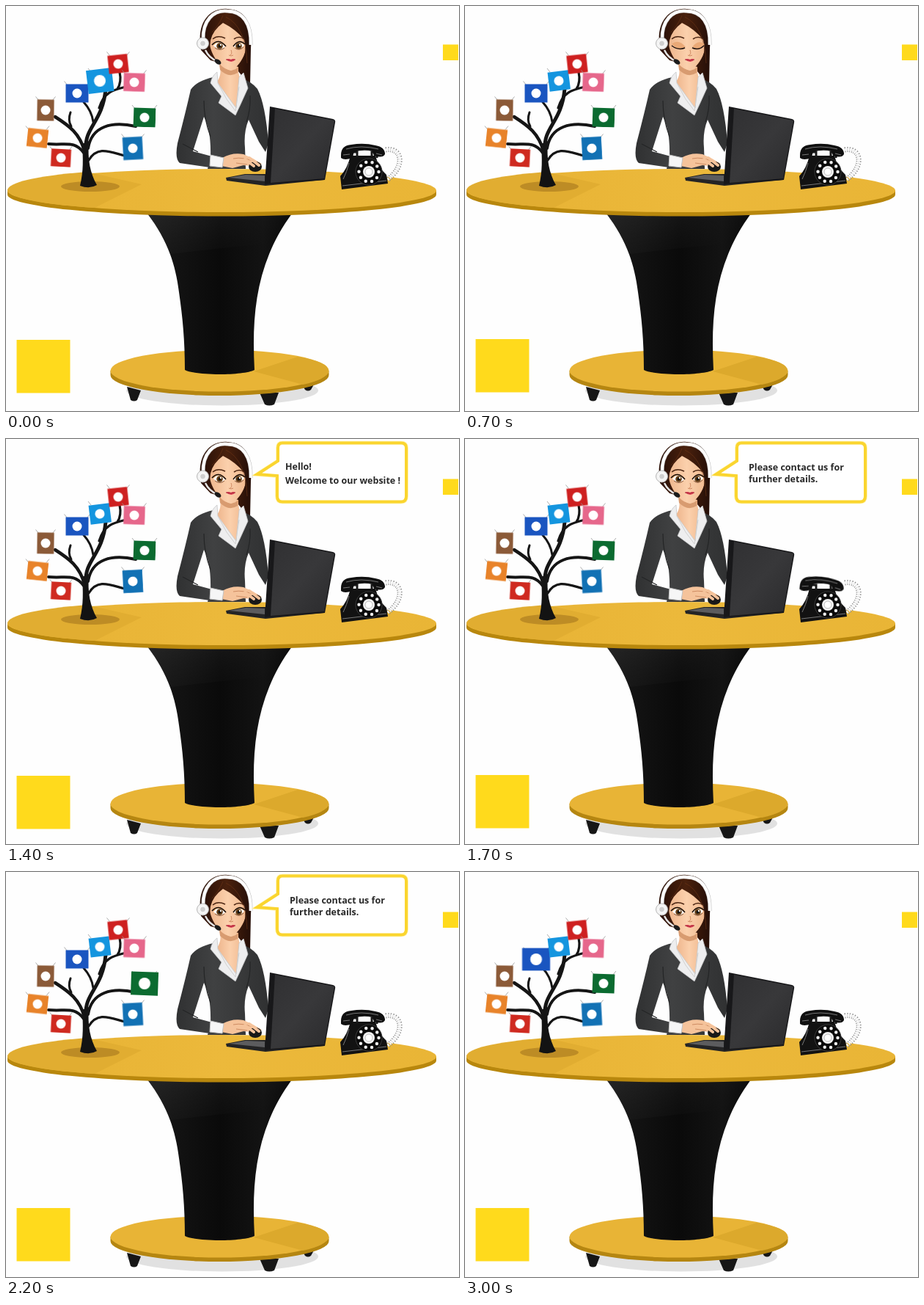
Animation, 618 px wide and 552 px high, one loop 3100 ms. Source, as an HTML page:

```html
<!DOCTYPE html>
<html lang="en">
<head>
<meta charset="utf-8">
<title>Reception desk</title>
<style>
html, body { margin: 0; width: 100%; height: 100%; overflow: hidden; background: #fefefe; }
svg { display: block; width: 618px; height: 552px; }
text { font: 700 12.5px "Open Sans", sans-serif; fill: #292929; }

.bob { animation: bob 3.1s linear infinite; }
.bob.small { animation-name: bob-small; }
.bubble, .hello, .contact, .shut, .open, .talk, .smile, .handset { animation: 3.1s step-end infinite; }
.bubble { animation-name: bubble; }
.hello { animation-name: hello; }
.contact { animation-name: contact; }
.shut { animation-name: shut; }
.open { animation-name: open; }
.talk { animation-name: talk; }
.smile { animation-name: smile; }
.handset { animation-name: ring; transform-origin: 486px 198px; }
.pulse { animation: pulse 3.1s step-end infinite; transform-box: fill-box; transform-origin: center; }

@keyframes bob {
  0%, 100% { transform: translateY(0); }
  22.6% { transform: translateY(-1px); }
  35.5% { transform: translateY(5px); }
  54.8%, 71% { transform: translateY(3px); }
  80.6% { transform: translateY(7px); }
  96.8% { transform: translateY(3px); }
}
@keyframes bob-small {
  0%, 22.6%, 100% { transform: translateY(0); }
  35.5%, 71% { transform: translateY(2px); }
  80.6% { transform: translateY(3px); }
  96.8% { transform: translateY(2px); }
}
@keyframes bubble { 0%, 77.2% { opacity: 0; } 32% { opacity: 1; } }
@keyframes hello { 0% { opacity: 1; } 48.2% { opacity: 0; } }
@keyframes contact { 0% { opacity: 0; } 48.2% { opacity: 1; } }
@keyframes shut { 0%, 25.6% { opacity: 0; } 19.2% { opacity: 1; } }
@keyframes open { 0%, 25.6% { opacity: 1; } 19.2% { opacity: 0; } }
@keyframes talk {
  0%, 38.5%, 45%, 51.4%, 64.3% { opacity: 0; }
  35.3%, 41.7%, 48.2%, 61.1% { opacity: 1; }
}
@keyframes smile {
  0%, 38.5%, 45%, 51.4%, 64.3% { opacity: 1; }
  35.3%, 41.7%, 48.2%, 61.1% { opacity: 0; }
}
@keyframes ring {
  0%, 51.4%, 58%, 64.3% { transform: none; }
  48.2%, 54.7%, 61.1% { transform: rotate(5deg); }
}
@keyframes pulse { 0% { transform: scale(1.23); } 3.2%, 100% { transform: none; } }
</style>
</head>
<body>
<svg viewBox="0 0 618 552">
  <defs>
    <linearGradient id="stem">
      <stop offset="0" stop-color="#171717"/><stop offset=".25" stop-color="#111"/>
      <stop offset=".5" stop-color="#0a0a0a"/><stop offset=".8" stop-color="#131313"/>
      <stop offset="1" stop-color="#090909"/>
    </linearGradient>
    <linearGradient id="sheen" x2="1" y2=".6">
      <stop offset="0" stop-color="#2c2c2c" stop-opacity=".7"/>
      <stop offset="1" stop-color="#181818" stop-opacity="0"/>
    </linearGradient>
    <linearGradient id="top">
      <stop offset="0" stop-color="#e6b133"/><stop offset=".5" stop-color="#ecb93b"/>
      <stop offset="1" stop-color="#e9b536"/>
    </linearGradient>
    <linearGradient id="lid" x2="1" y2="1">
      <stop offset="0" stop-color="#303032"/><stop offset=".5" stop-color="#38383a"/>
      <stop offset="1" stop-color="#2a2a2c"/>
    </linearGradient>
    <linearGradient id="suit">
      <stop offset="0" stop-color="#303132"/><stop offset=".4" stop-color="#404142"/>
      <stop offset="1" stop-color="#303132"/>
    </linearGradient>
    <linearGradient id="skin">
      <stop offset="0" stop-color="#eeb58c"/><stop offset=".5" stop-color="#fbd0ac"/>
      <stop offset="1" stop-color="#f0b98f"/>
    </linearGradient>
    <linearGradient id="hair">
      <stop offset="0" stop-color="#2b1108"/><stop offset=".5" stop-color="#4a210d"/>
      <stop offset="1" stop-color="#260f08"/>
    </linearGradient>
  </defs>

  <rect class="bob" x="14.5" y="455" width="73" height="72.5" fill="#ffda1c"/>
  <rect class="bob small" x="596" y="52.5" width="21" height="21.5" fill="#ffda1c"/>

  <!-- Stand -->
  <ellipse cx="295" cy="524" rx="131" ry="20.5" fill="#e1e1e1"/>
  <path d="M165 519L184 524 179 537Q175 540 170 537ZM346 527H372L366 543Q359 546 353 543ZM405 518L421 514 416 523Q412 526 408 523Z" fill="#161616"/>
  <path d="M142.500 497V503A149 28 0 0 0 440.500 503V497Z" fill="#b58611"/>
  <ellipse cx="291.500" cy="497" rx="149" ry="28.500" fill="#e8b436"/>
  <path d="M338 498L398 478Q440 485 440 497 438 509 405 516Z" fill="#dca92c"/>
  <path d="M193 283C219 317 231 350 236 390 241 425 244 455 244 496 258 504 324 504 339 496 335 420 341 350 390 283Z" fill="url(#stem)"/>
  <path d="M193 283H390Q375 304 365 323 292 330 224 338 214 311 193 283Z" fill="url(#sheen)"/>

  <!-- Table top -->
  <path d="M2 251V257A292.5 29.5 0 0 0 587 257V251Z" fill="#b8870d"/>
  <ellipse cx="294.5" cy="251.5" rx="292.5" ry="29.5" fill="url(#top)"/>
  <path d="M2 251C8 263 55 271 121 275L185 243 110 226Q4 235 2 251Z" fill="#e1ad31"/>

  <!-- Tree -->
  <ellipse cx="115" cy="246" rx="40" ry="7" fill="#bd8c25"/>
  <path d="M101 245C106 225 105 207 104 188L113 184C111 210 115 228 124 244Q114 250 101 245Z" fill="#131313"/>
  <g fill="none" stroke="#151515" stroke-linecap="round">
    <path d="M109 195C107 165 132 158 136 113" stroke-width="5"/>
    <path d="M107 198C101 174 86 163 67 151" stroke-width="4.5"/>
    <path d="M89 164Q84 156 88 145M119 158Q117 143 106 131" stroke-width="3"/>
    <path d="M106 200C93 183 82 190 58 188M112 194C117 163 145 157 177 164" stroke-width="4"/>
    <path d="M113 210C125 190 142 199 162 204M127 139C134 116 148 114 164 110M152 113Q158 104 155 90" stroke-width="3.2"/>
  </g>
  <g id="cards"></g>

  <!-- Receptionist -->
  <path d="M266 60C259 20 280 2 302 4 331 5 336 30 334 58L333 108Q323 97 312 83L279 74Z" fill="url(#hair)"/>
  <path d="M290 76Q296 92 288 103L313 145 324 103Q316 98 317 83Z" fill="url(#skin)"/>
  <path d="M291 79Q306 94 317 83L316 91Q304 99 292 87Z" fill="#d89b70"/>
  <path d="M277 46C278 26 291 18 305 20 322 22 329 37 328 54 327 70 314 86 307 88 295 85 279 71 277 46Z" fill="url(#skin)"/>
  <path d="M270 61Q267 17 297 10 321 8 332 42L333 105Q323 95 322 78 329 61 325 46 314 32 296 23 282 33 279 47L277 66Z" fill="url(#hair)"/>
  <path d="M281 36Q290 27 296 13M300 15Q327 28 329 78" fill="none" stroke="#733a18" opacity=".55"/>

  <path d="M282 45Q289 39 299 44M311 45Q318 40 325 45" fill="none" stroke="#4e2815" stroke-width="1.6"/>
  <g class="open">
    <path d="M282 53Q290 42 300 54ZM310 54Q318 43 326 52Z" fill="#e9a35c"/>
    <path d="M283 54Q290 45 299 55 291 63 283 54ZM311 55Q317 46 325 53 319 62 311 55Z" fill="#fff"/>
    <circle cx="291.500" cy="54.500" r="4.300" fill="#674019"/><circle cx="317.500" cy="54.500" r="4.300" fill="#674019"/>
    <circle cx="291.500" cy="54.500" r="2" fill="#111"/><circle cx="317.500" cy="54.500" r="2" fill="#111"/>
    <circle cx="293" cy="53" r="1.200" fill="#fff"/><circle cx="319" cy="53" r="1.200" fill="#fff"/>
    <path d="M281 53Q290 43 300 55M310 55Q318 44 326 52" fill="none" stroke="#19100d" stroke-width="1.6"/>
    <path d="M285 57Q292 62 298 57M312 57Q318 62 324 56" fill="none" stroke="#6b3c22" stroke-width=".8"/>
  </g>
  <g class="shut">
    <path d="M282 52Q291 44 301 56L291 59Z" fill="#eaa977"/>
    <path d="M310 56Q318 45 327 52L318 59Z" fill="#eaa977"/>
    <path d="M282 54Q291 61 300 57M310 57Q319 61 326 54" fill="none" stroke="#20120e" stroke-width="1.5"/>
  </g>
  <path d="M307 60Q309 65 306 67M304 67Q307 69 310 67" fill="none" stroke="#cf8962"/>
  <path class="smile" d="M300 73Q303 71 307 73 310 71 313 73 308 79 300 73Z" fill="#dd4257"/>
  <path class="smile" d="M300 73Q306 75 313 73" fill="none" stroke="#8f1f2c" stroke-width=".7"/>
  <g class="talk">
    <circle cx="307" cy="75" r="4.500" fill="#e2607a"/>
    <ellipse cx="307" cy="75" rx="2" ry="1.500" fill="#761b2a"/>
  </g>

  <g fill="none">
    <path d="M269 46C268 20 283 5 302 7 323 7 335 24 334 53" stroke="#bdbdbd" stroke-width="5"/>
    <path d="M269 46C268 20 283 5 302 7 323 7 335 24 334 53" stroke="#fff" stroke-width="3.8"/>
  </g>
  <circle cx="268.500" cy="51" r="8" fill="#f4f4f4" stroke="#b5b5b5"/>
  <circle cx="268.500" cy="51" r="4" fill="#cfcfcf" stroke="#fff"/>
  <path d="M272 60Q277 71 288 75" fill="none" stroke="#e4e4e4" stroke-width="2.5"/>
  <ellipse cx="289" cy="76" rx="5" ry="3" transform="rotate(35 289 76)" fill="#1b1b1b"/>

  <path d="M283 97Q260 102 252 114 245 145 234 187 230 208 237 214L278 220 281 205 255 198 270 151Q280 170 279 205L275 222H327L326 193Q324 172 331 155L345 185 354 199 358 187Q354 134 343 113 334 102 321 99L313 145Z" fill="url(#suit)"/>
  <path d="M270 129Q270 155 279 178M333 122Q334 141 328 158M241 188L262 199" fill="none" stroke="#242526" stroke-width="1.2"/>
  <path d="M288 90Q281 95 279 105L294 123 290 132 313 149 320 134 330 112 324 91 318 97 314 139 289 105Z" fill="#eeeeef" stroke="#c6c7c8" stroke-width=".8"/>
  <path d="M289 105L301 127 313 143 318 110" fill="none" stroke="#d0d0d0"/>
  <path d="M295 207Q309 199 324 202L337 208 349 215 344 219 324 217 309 221 294 218Z" fill="#f5c39b"/>
  <path d="M310 208Q324 205 340 213M314 214L329 216" fill="none" stroke="#ce8c62"/>
  <ellipse cx="340" cy="219" rx="9" ry="7" fill="#191919"/>
  <path d="M326 209L338 218M332 207L345 217" stroke="#f5c39b" stroke-width="4" stroke-linecap="round"/>
  <path d="M279 203L297 207 295 220 278 218Z" fill="#f6f6f6" stroke="#c2c2c2"/>

  <!-- Laptop -->
  <path d="M300 234L326 229 355 229 434 237 354 245 301 238Z" fill="#242425"/>
  <path d="M304 234L327 230 353 231V239Z" fill="#5c5c5e"/>
  <path d="M360 137L446 154Q450 155 449 159L435 237 353 243Z" fill="#18181a"/>
  <path d="M367 140L448 156 434 235 361 241Z" fill="url(#lid)"/>

  <!-- Telephone -->
  <g fill="none">
    <path d="M518 196C540 192 546 218 520 237" stroke="#888" stroke-width="7" stroke-dasharray="1.2 2"/>
    <path d="M518 196C540 192 546 218 520 237" stroke="#f4f4f4" stroke-width="4" stroke-dasharray="2 1.2"/>
  </g>
  <path d="M470 204H504Q508 220 519 230L521 242 458 250 456 232Q466 221 470 204Z" fill="#121212"/>
  <path d="M468 214Q465 226 460 236M459 245L519 238" fill="none" stroke="#777"/>
  <path d="M472 206V199H479V206M499 205V199H506V207" stroke="#191919" stroke-width="3" fill="none"/>
  <circle cx="495" cy="226" r="18" fill="#090909" stroke="#3a3a3a"/>
  <circle cx="495" cy="226" r="13.500" fill="none" stroke="#eee" stroke-width="4.500" stroke-linecap="round" stroke-dasharray="0 8.480"/>
  <circle cx="495" cy="226" r="8" fill="#f3f3f3"/>
  <circle cx="495" cy="226" r="5" fill="#fff" stroke="#bbb"/>
  <g class="handset">
    <path d="M457 203Q457 190 471 189 488 186 504 190 517 192 517 202 514 208 502 204L500 198Q487 195 475 199L472 207Q462 211 457 207Z" fill="#101010"/>
    <path d="M464 195Q484 189 508 195M460 203L469 202M505 201L513 203" stroke="#777" fill="none"/>
  </g>

  <!-- Speech -->
  <g class="bubble">
    <path d="M377 5.500H539Q546 5.500 546 12V78Q546 85.500 539 85.500H377Q370 85.500 370 78V50L343 48 371 30V12Q371 5.500 377 5.500Z" fill="#fff" stroke="#fff0a0" stroke-width="5.500"/>
    <path d="M377 5.500H539Q546 5.500 546 12V78Q546 85.500 539 85.500H377Q370 85.500 370 78V50L343 48 371 30V12Q371 5.500 377 5.500Z" fill="#fff" stroke="#fad52f" stroke-width="4"/>
    <g class="hello"><text x="381" y="42">Hello!</text><text x="381" y="61">Welcome to our website !</text></g>
    <g class="contact"><text x="387" y="43">Please contact us for</text><text x="387" y="58.500">further details.</text></g>
  </g>
</svg>
<script>
const LOOP = 3100;
// x, y, width, height, tilt, colour, pulse times in ms
const cards = [
  [75, 207, 27, 24, 3, "#cf2a20", 2700],
  [43, 180, 28, 25, 6, "#e8832a", 2800],
  [54, 142, 23, 29, 1, "#8b5a38", 2900],
  [97, 119, 31, 25, 0, "#1a55c0", 3000, 2600],
  [128, 102, 28, 26, -7, "#1495df", 0, 2500],
  [153, 79, 27, 25, -6, "#ce2020", 100, 2400],
  [175, 104, 29, 25, 2, "#e6678b", 200, 2300],
  [189, 152, 30, 26, 2, "#0b6b30", 300, 2200],
  [173, 194, 27, 31, -3, "#1271b4", 400, 2100]
];

function pulse(content, time) {
  if (time === undefined) return content;
  const delay = time - LOOP - 10;
  return `<g class="pulse" style="animation-delay:${delay}ms">${content}</g>`;
}

function card([x, y, w, h, tilt, colour, first, second]) {
  const face = `<g transform="translate(${x} ${y}) rotate(${tilt})">
    <rect x="${-w / 2}" y="${-h / 2}" width="${w}" height="${h}" fill="${colour}"/>
    <circle r="6.5" fill="#fff"/></g>`;
  const string = `<path d="M${x - w / 2 + 2} ${y - h / 2 + 1}l-4 -5M${x + w / 2 - 2} ${y - h / 2 + 1}l4 -5"
    stroke="#999" stroke-width=".8"/>`;
  return string + pulse(pulse(face, first), second);
}

document.getElementById("cards").innerHTML = cards.map(card).join("");
</script>
</body>
</html>
```
